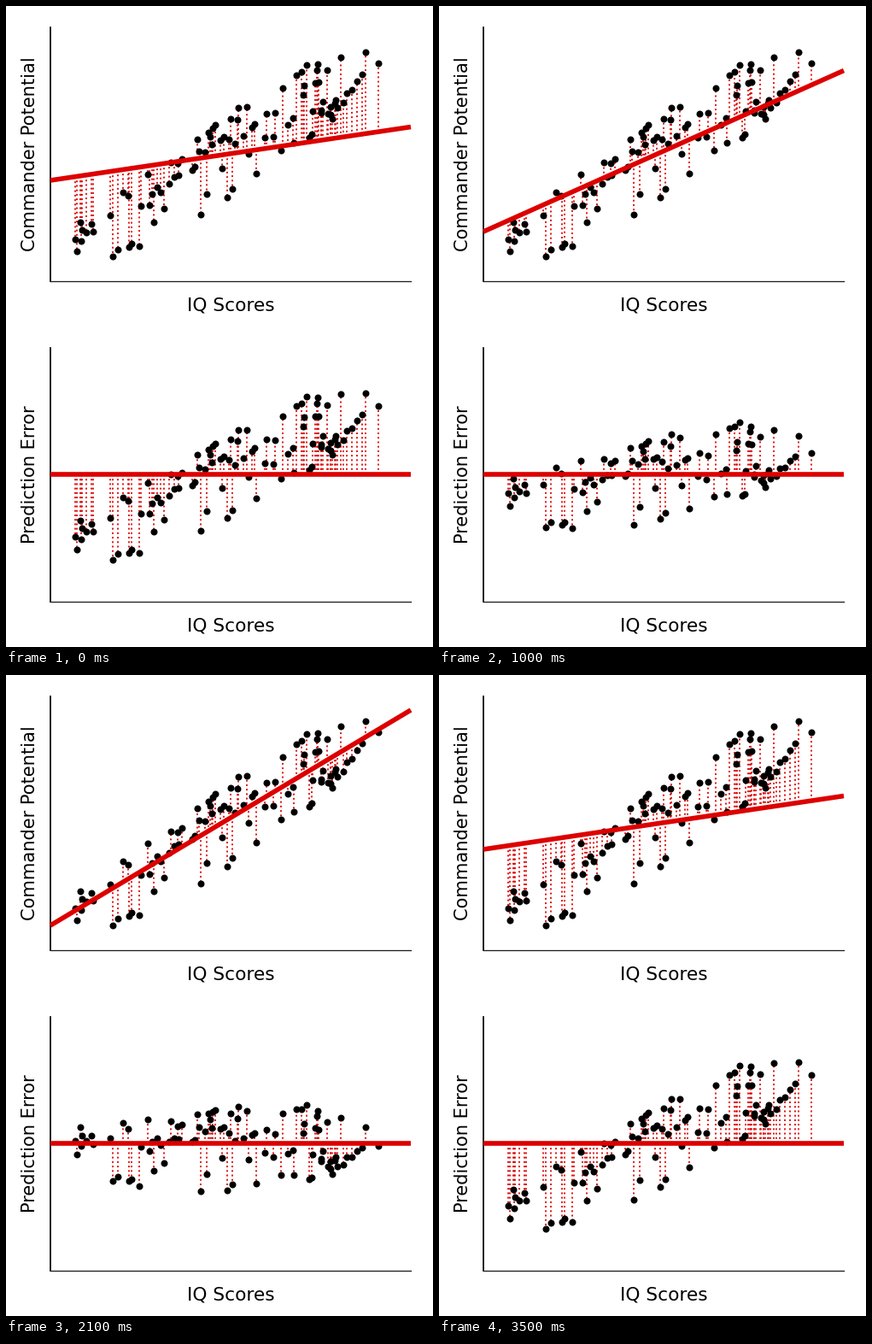
Write a matplotlib script that moves like this. It is 500 px wide and 750 px high and loops after 4 s.

```python
import matplotlib.pyplot as plt
import numpy as np
from matplotlib.animation import FuncAnimation
from matplotlib.collections import LineCollection

W, H, DPI = 500, 750, 100
PX = 72 / DPI
RED = "#dd0000"
LEFT, RIGHT = 52, 474
ZERO = 548

# Left and right height of the fitted line at each stage, and the loop through them.
FITS = [(204, 141.5), (232, 111.5), (264, 75.5), (293, 41)]
STAGES = [0, 1, 2, 3, 3, 2, 1, 0]

SINGLES = [
    (122, 245), (137, 218), (143, 222), (156, 281), (166, 197), (173, 253),
    (181, 218), (185, 237), (202, 198), (206, 179), (228, 244), (233, 171),
    (235, 220), (237, 148), (253, 190), (255, 153), (268, 161), (278, 152),
    (284, 173), (293, 196), (322, 169), (324, 96), (337, 160), (340, 81),
    (348, 104), (349, 93), (362, 90), (365, 68), (371, 112), (376, 75),
    (380, 127), (392, 60), (399, 102), (405, 98), (421, 54), (436, 67),
]
# Neighbouring scores: each start point has a partner one step away.
PAIRS = {
    (6, -8): [(125, 293), (330, 139), (411, 88), (191, 208), (171, 220), (346, 77)],
    (10, -1): [(303, 154), (305, 126), (158, 234), (251, 157), (359, 123),
               (385, 114), (272, 119)],
    (2, 14): [(81, 273), (224, 156), (380, 118), (364, 75)],
    (3, -4): [(355, 154), (242, 143), (288, 142), (218, 192), (144, 282)],
    (2, 9): [(100, 255), (87, 253), (239, 153), (386, 110)],
    (8, 1): [(193, 183), (369, 125), (263, 132)],
    (6, -10): [(88, 275), (259, 224)],
}


def all_points():
    points = list(SINGLES)
    for (dx, dy), starts in PAIRS.items():
        for x, y in starts:
            points += [(x, y), (x + dx, y + dy)]
    return np.array(points, float).T


X, Y = all_points()

fig = plt.figure(figsize=(W / DPI, H / DPI), dpi=DPI, facecolor="white")
ax = fig.add_axes([0, 0, 1, 1])
ax.set(xlim=(0, W), ylim=(H, 0))
ax.axis("off")


def label(x, y, text, size, rotation=0):
    ax.text(x, y, text, family="DejaVu Sans", size=size * PX, color="black",
            ha="center", va="baseline", rotation=rotation, rotation_mode="anchor")


class Panel:
    def __init__(self, top, name):
        base = top + 297
        ax.plot([LEFT, LEFT], [top, base], color="black", lw=1.7 * PX, zorder=1)
        ax.plot([LEFT, RIGHT], [base, base], color="#1c1c20", lw=1.3 * PX, zorder=1)
        label(263.5, base + 34.7, "IQ Scores", 21.7)
        label(34, top + 148, name, 21, rotation=90)
        self.errors = LineCollection([], colors=RED, linewidths=1.8 * PX,
                                     linestyles=[(0, (1.1, 1.8))], zorder=2)
        ax.add_collection(self.errors)
        self.dots, = ax.plot([], [], "o", color="black", ms=8 * PX, mew=0, zorder=3)
        self.line, = ax.plot([], [], color=RED, lw=5.6 * PX, zorder=4,
                             solid_capstyle="butt")

    def show(self, y, fitted, ends):
        self.errors.set_segments([[(a, f), (a, b)] for a, b, f in zip(X, y, fitted)])
        self.dots.set_data(X, y)
        self.line.set_data([LEFT, RIGHT], ends)
        return self.errors, self.dots, self.line


scores = Panel(25, "Commander Potential")
residuals = Panel(400, "Prediction Error")


def update(frame):
    ends = FITS[STAGES[frame]]
    fitted = np.interp(X, [LEFT, RIGHT], ends)
    flat = np.full_like(X, ZERO)
    return (*scores.show(Y, fitted, ends),
            *residuals.show(ZERO + Y - fitted, flat, (ZERO, ZERO)))


anim = FuncAnimation(fig, update, frames=len(STAGES), interval=500,
                     repeat=True, repeat_delay=0)
plt.show()
```
